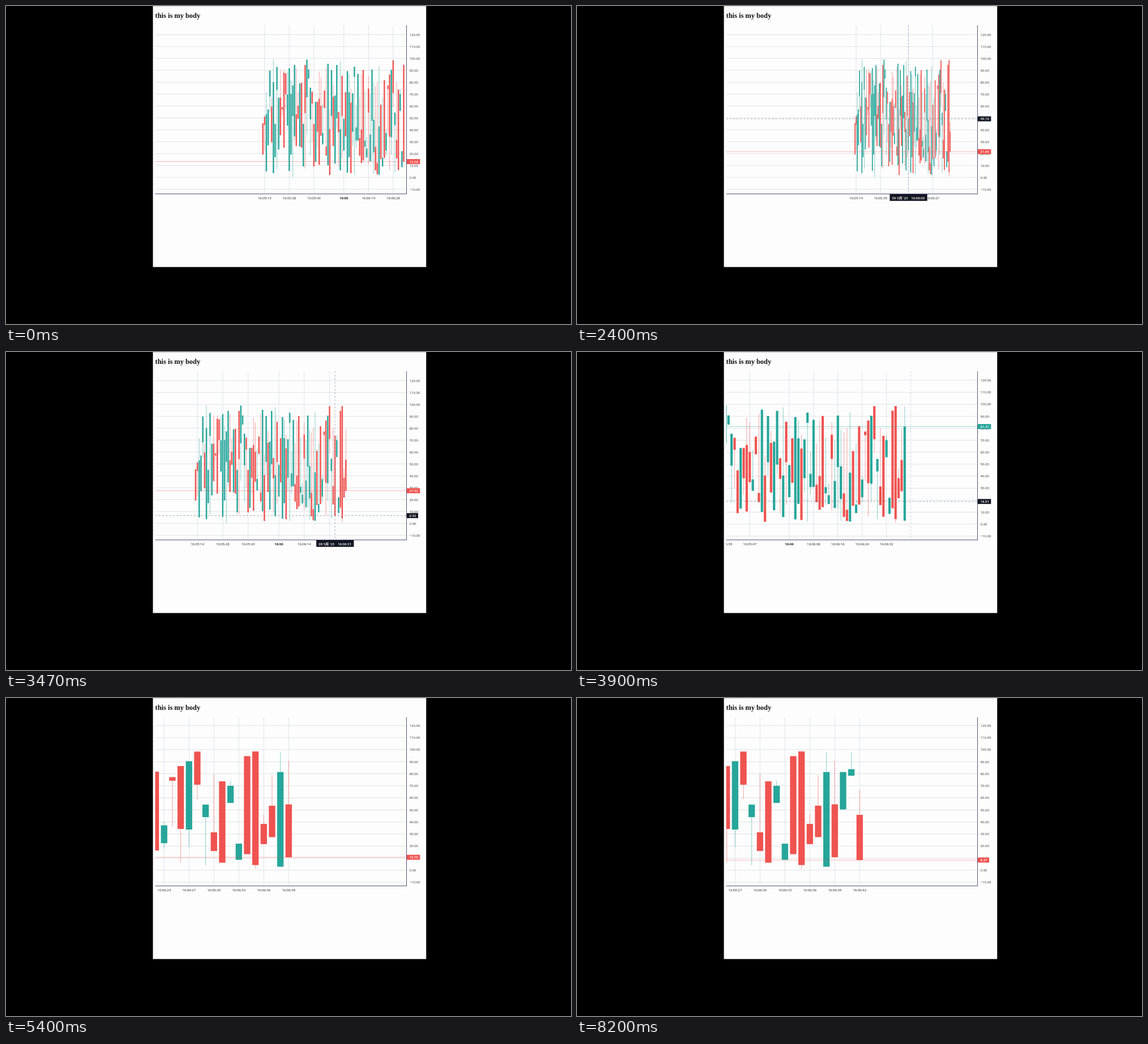
Animation of 998 by 561 pixels, one loop 8300 ms. Source, as an HTML page with a canvas:

```html
<!DOCTYPE html>
<html lang="en">
<head>
<meta charset="utf-8">
<title>Live candlestick chart</title>
<style>
  html, body { margin: 0; width: 100%; height: 100%; overflow: hidden; background: #000; }
  canvas { position: absolute; left: 0; top: 0; }
  h2 { position: absolute; left: 263.6px; top: 10px; margin: 0; color: #111;
       font: bold 12.4px/14px "Liberation Serif", Times, serif; white-space: nowrap; }
</style>
</head>
<body>
<canvas width="998" height="561"></canvas>
<h2>this is my body</h2>
<script>
const LOOP = 8300;
const UP = '#26a69a', DOWN = '#ef5350', INK = '#131722';
const LEFT = 263.5, RIGHT = 707.5, TOP = 34, BOTTOM = 331.5;
const FONT = '"Open Sans", "Noto Sans CJK SC", "Noto Sans CJK JP", sans-serif';
const ctx = document.querySelector('canvas').getContext('2d');

// Older bars: [open, close]; their wicks are random.
const older = [
  [45.5, 19.2], [51.2, 44], [5, 53], [27, 57], [68, 89.8], [59.5, 29.5], [3.5, 80], [17, 45],
  [73.5, 92.8], [23.5, 67], [67, 35.5], [59, 57], [88, 25], [87.4, 70], [43.5, 69.7], [5.4, 91.8],
  [19.2, 70], [51.6, 77.3], [34.5, 94.5], [53, 26.4], [60.2, 49.2], [26, 79], [79.5, 25], [9.2, 45],
  [94.5, 54], [67.3, 99], [83, 90.7], [48.8, 75.4], [72, 62], [44.9, 9.2], [13, 63.5], [63.5, 38.3],
  [66, 10.6], [60.2, 35], [27.8, 37.3], [73, 58.3], [26, 18.3], [10.2, 95.5], [40.6, 2], [51.6, 90.2],
  [67.8, 26.4], [11.6, 68.8], [49.7, 94.5], [55, 37.8], [5.9, 40.6], [85.4, 51.6], [22.5, 49.2],
  [71.6, 34.5], [4, 89.3], [17, 71.6], [63, 3.5], [38.3, 70.7], [84.5, 93], [31, 42], [31, 87],
  [33, 18.3], [40.2, 12]
];
// Recent bars: [open, close, high, low]; a missing wick ends at the body.
const recent = [
  [90.2, 14.2], [25.7, 30.9, 72.3, 15.4], [16.8, 24.2, 33.7], [74.6, 54.4, 85, 11.1],
  [13.5, 36, 70], [47.6, 90.6, 0, 13], [21, 48.3, 79, 3], [25.7, 6, 76.5], [12, 2.7, 79.8],
  [2.2, 42.9, 93.4], [61, 15.4], [9.3, 16.3, 67], [81.7, 16.3], [22.4, 37.2, 40, 18],
  [77.2, 74.2, 0, 36], [86.4, 34.2, 0, 6.4], [33.7, 90.4, 0, 19], [98.4, 70.9, 0, 59],
  [44, 54.4, 0, 4], [31.4, 15.9, 79.8], [73.7, 6.2], [55.8, 70, 74.2], [8.6, 22],
  [94.6, 13.28], [98.5, 4.26, 0, 1.05], [38.4, 21.6, 46.5], [53.5, 27.42, 78.9],
  [2.9, 81.41, 98.2], [54.6, 10.7, 90.7], [50.4, 81.38], [78.4, 83.8, 98.2], [45.9, 8.37, 66.6]
];

let seed = 7;
const random = () => (seed = seed * 16807 % 2147483647) / 2147483647;
const toBar = ([open, close, high = 0, low = 100]) => ({
  open, close, high: Math.max(open, close, high), low: Math.min(open, close, low)
});
const bars = [
  ...older.map(([open, close]) => toBar([open, close, 98 * random(), 2 + 98 * random()])),
  ...recent.map(toBar)
];
bars[6].high = 99.1;
bars[17].low = 0.4;

// [time, x of the newest bar, bar spacing]
const views = [[0, 702.5, 3.11], [1850, 702.5, 3.11], [2300, 659.3, 2.053], [2450, 659.3, 2.053],
  [3420, 600.3, 3.198], [3600, 600.3, 3.198], [4550, 532.6, 10.04], [4650, 532.6, 10.04],
  [5150, 499.3, 14.67]];
// [time, pointer x, pointer y]
const pointer = [[1880, 575, 329], [2350, 586, 199.076], [2450, 586, 199.076],
  [3420, 581, 288.652], [3550, 581, 288.652], [4450, 602.5, 224.722],
  [4750, 602.5, 224.722], [5220, 605, 329]];

function sample(keys, t) {
  const i = keys.findIndex(k => k[0] > t);
  if (i < 0) return keys[keys.length - 1].slice(1);
  if (i === 0) return keys[0].slice(1);
  const a = keys[i - 1], b = keys[i], p = (t - a[0]) / (b[0] - a[0]);
  return [1, 2].map(j => a[j] + (b[j] - a[j]) * p);
}

const pad = n => String(n).padStart(2, '0');
// Seconds after 16:05; one second has no bar.
const seconds = i => i + (i <= 22 ? 13 : 14);
function clock(i, full) {
  const s = seconds(i), sec = s % 60;
  return `16:${pad(5 + Math.floor(s / 60))}` + (sec || full ? ':' + pad(sec) : '');
}

function tickMarks(spacing, last) {
  const gap = Math.ceil(42.5 / spacing), minute = 46, marks = [];
  for (let i = 1; i <= minute - gap; i += gap) marks.push(i);
  for (let i = minute; i <= last; i += gap) marks.push(i);
  return marks;
}

function line(x1, y1, x2, y2, color, width = 1, dash = []) {
  ctx.strokeStyle = color;
  ctx.lineWidth = width;
  ctx.setLineDash(dash);
  ctx.beginPath();
  ctx.moveTo(x1, y1);
  ctx.lineTo(x2, y2);
  ctx.stroke();
}

function box(x, y, w, h, color) {
  ctx.fillStyle = color;
  ctx.fillRect(x, y, w, h);
}

function label(str, x, y, color, align = 'left', weight = 400) {
  ctx.font = `${weight} 6px ${FONT}`;
  ctx.textAlign = align;
  ctx.textBaseline = 'alphabetic';
  ctx.fillStyle = color;
  ctx.fillText(str, x, y + 2.2);
}

function clipped(x, y, w, h, paint) {
  ctx.save();
  ctx.beginPath();
  ctx.rect(x, y, w, h);
  ctx.clip();
  paint();
  ctx.restore();
}

function priceTag(value, y, color) {
  const str = value.toFixed(2);
  box(708, y - 4.4, str.length > 4 ? 23.3 : 20, 8.8, color);
  label(str, 712.6, y, '#fff', 'left', 600);
}

function draw(t) {
  const last = 80 + Math.floor(t / 1000 + 0.2);
  const [lastX, spacing] = sample(views, t);
  const xOf = i => lastX + (i - last) * spacing;

  const first = Math.max(0, Math.ceil(last - (lastX - LEFT) / spacing - 0.5));
  const shown = bars.slice(first, last + 1);
  const min = Math.min(...shown.map(b => b.low));
  const max = Math.max(...shown.map(b => b.high));
  const scale = 207.2 / (max - min);
  const yOf = v => 301.5 - (v - min) * scale;

  const marks = tickMarks(spacing, last);
  const newest = bars[last];
  const newestColor = newest.close >= newest.open ? UP : DOWN;
  const closeY = yOf(newest.close);
  const hover = t >= pointer[0][0] && t < pointer[pointer.length - 1][0];
  const [px, py] = sample(pointer, t);
  const hoverBar = last + Math.round((px - lastX) / spacing);
  const hoverX = xOf(hoverBar);

  box(0, 0, 998, 561, '#000');
  box(259.5, 0, 482.7, 460.5, '#fdfdfd');
  box(259.5, 0, 482.7, 1, '#cfcfdd');

  clipped(LEFT, TOP, RIGHT - LEFT, BOTTOM - TOP, () => {
    for (const i of marks) line(xOf(i), TOP, xOf(i), BOTTOM, '#e0e3ea');
    for (let v = -10; v <= 120; v += 10) line(LEFT, yOf(v), RIGHT, yOf(v), '#e0e2e6');

    const width = spacing * 0.77;
    shown.forEach((b, k) => {
      const x = xOf(first + k), color = b.close >= b.open ? UP : DOWN;
      const top = yOf(Math.max(b.open, b.close)), bottom = yOf(Math.min(b.open, b.close));
      line(x, yOf(b.high), x, yOf(b.low), color, 0.52);
      box(x - width / 2, top, width, bottom - top, color);
    });

    line(LEFT, closeY, RIGHT, closeY, newestColor, 0.8, [1, 1]);
    if (hover) {
      line(hoverX, TOP, hoverX, BOTTOM, hoverBar > last ? '#c3c8d6' : '#949cab', 0.8, [3.1, 3.1]);
      line(LEFT, py, RIGHT, py, '#858e9c', 0.8, [3.1, 3.1]);
    }
  });

  line(RIGHT, TOP, RIGHT, BOTTOM, '#56567c');
  line(LEFT, BOTTOM, RIGHT + 0.5, BOTTOM, '#56567c');

  for (let v = -10; v <= 120; v += 10) label(v.toFixed(2).replace('-', '−'), 712.6, yOf(v), '#333');
  clipped(LEFT, BOTTOM, RIGHT - LEFT, 20, () => {
    for (const i of marks) label(clock(i), xOf(i), 338.5, '#222', 'center', seconds(i) % 60 ? 400 : 700);
  });

  priceTag(newest.close, closeY, newestColor);
  if (hover) {
    priceTag(min + (301.5 - py) / scale, py, INK);
    if (hoverBar >= 0 && hoverBar <= last) {
      box(hoverX - 33, 332, 66.3, 11.8, INK);
      label("09 5月 '23", hoverX - 28.8, 338.8, '#fff', 'left', 600);
      label(clock(hoverBar, true), hoverX + 28.8, 338.8, '#fff', 'right', 600);
    }
  }
}

const start = performance.now();
function frame() {
  draw((performance.now() - start) % LOOP);
  requestAnimationFrame(frame);
}
frame();
</script>
</body>
</html>
```
